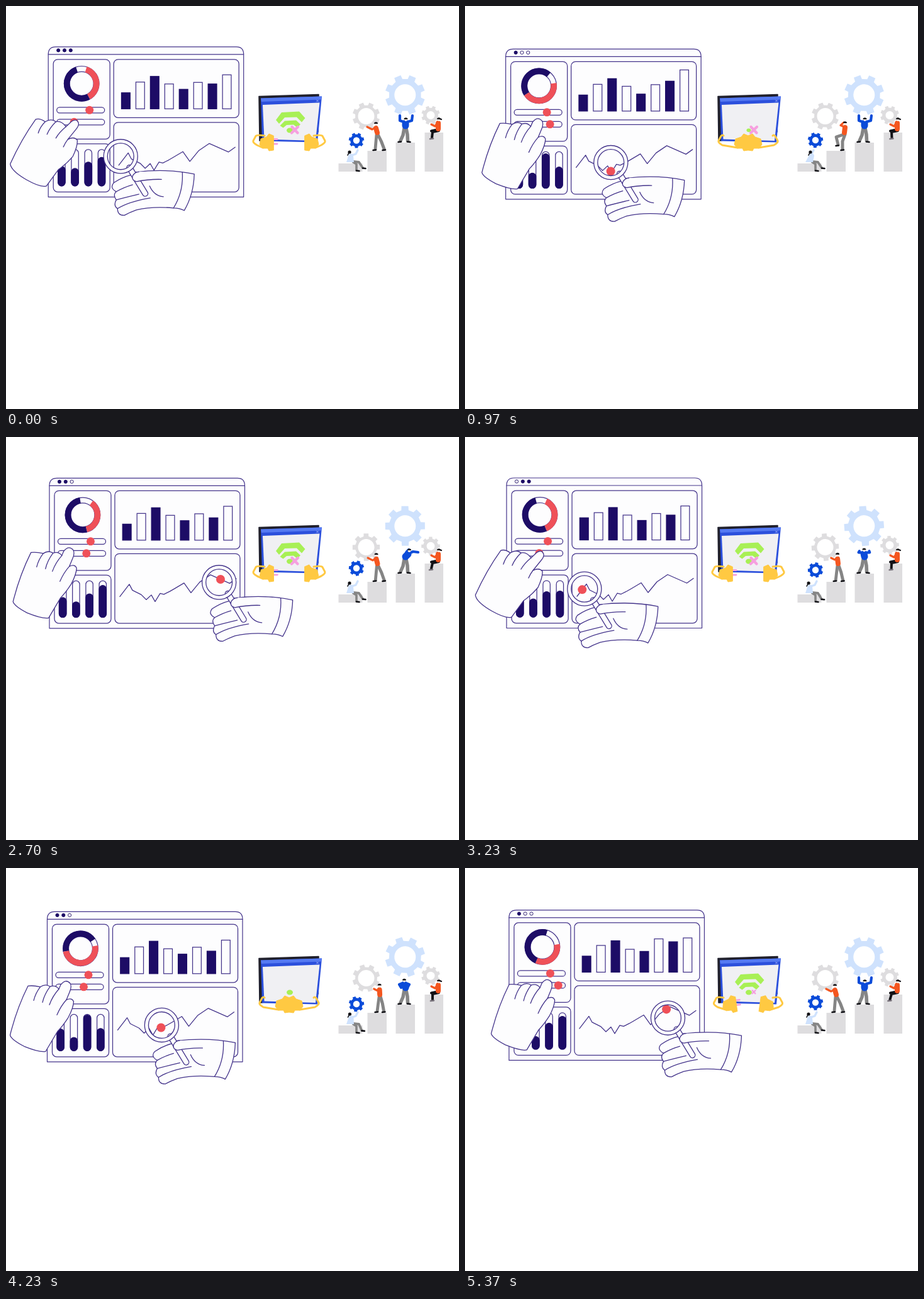
Write an HTML page that moves like this. It is 720 by 640 pixels and loops after 5.41 s.

```html
<!DOCTYPE html>
<html lang="en">
<head>
<meta charset="utf-8">
<title>Dashboard animation</title>
<style>
html, body { margin: 0; width: 100%; height: 100%; overflow: hidden; background: #fff; }
svg { display: block; width: 720px; height: 640px; }
</style>
</head>
<body>
<svg id="stage" viewBox="0 0 720 640" xmlns="http://www.w3.org/2000/svg"></svg>
<script>
const LOOP = 5410, CYCLE = 3030, TAU = 2 * Math.PI;
const NAVY = '#1d0c66', LINE = '#44348b', RED = '#ef5058', PAPER = '#fdfdfe';
const GREY = '#dedddf', BLUE = '#0b4bd9', SKY = '#cfe2fd', ORANGE = '#f4561f';
const BLACK = '#111116', PANTS = '#858585', YELLOW = '#ffc942', PINK = '#f6a0df', GREEN = '#a8f055';
const stage = document.getElementById('stage');

const clamp = v => Math.max(0, Math.min(1, v));
const lerp = (a, b, u) => a + (b - a) * u;
const fix = v => +v.toFixed(2);
const ramp = (v, from, to) => clamp((v - from) / (to - from));
const smooth = u => u * u * (3 - 2 * u);
const ease = (v, from, to) => smooth(ramp(v, from, to));
const wave = (p, peak = 0) => Math.cos(TAU * (p - peak));
// Rounded pulse around a centre, zero beyond its half width.
const bump = (v, centre, half) => Math.cos(clamp(Math.abs(v - centre) / half) * Math.PI / 2) ** 2;
const blend = (a, b, u) => a.map((v, i) => fix(lerp(v, b[i], u)));

function morph(from, to, u) {
  const goal = to.match(/[\d.]+/g);
  let i = 0;
  return from.replace(/[\d.]+/g, n => fix(lerp(+n, +goal[i++], u)));
}

const group = (x, y, body, more = '') => `<g transform="translate(${fix(x)} ${fix(y)}) ${more}">${body}</g>`;
const path = (d, fill = 'none', stroke = 'none', width = 1.3) =>
  `<path d="${d}" fill="${fill}" stroke="${stroke}" stroke-width="${width}" stroke-linecap="round" stroke-linejoin="round"/>`;
const rect = (x, y, w, h, r, fill = PAPER, stroke = LINE) =>
  `<rect x="${fix(x)}" y="${fix(y)}" width="${w}" height="${fix(h)}" rx="${r}" fill="${fill}" stroke="${stroke}" stroke-width="1.25"/>`;
const disc = (x, y, r, fill, stroke = 'none', width = 1.2) =>
  `<circle cx="${fix(x)}" cy="${fix(y)}" r="${r}" fill="${fill}" stroke="${stroke}" stroke-width="${width}"/>`;
const limb = (points, color, width) => path('M' + points.map(p => p.map(fix)).join(' '), 'none', color, width);

/* Dashboard: p runs through the slow cycle, q twice as fast */
const CHART = [[179, 253], [194, 233.5], [199, 243], [213, 250], [221, 258], [229, 250.5], [235, 261], [243, 248],
  [249, 249.5], [258, 245], [265, 241], [281, 231.5], [292, 247], [306, 230], [323, 218.5], [353.5, 232], [364, 224.5]];
const BAR_HEIGHTS = [25.5, 42.5, 51.5, 39.5, 31, 42, 39.5, 54];

function chartY(x) {
  const i = Math.max(1, CHART.findIndex(point => point[0] >= x));
  const [a, b] = [CHART[i - 1], CHART[i]];
  return lerp(a[1], b[1], ramp(x, a[0], b[0]));
}

function arc(from, to, color) {
  const at = deg => {
    const a = (deg - 90) * Math.PI / 180;
    return `${fix(120 + 23.5 * Math.cos(a))} ${fix(123.5 + 23.5 * Math.sin(a))}`;
  };
  return `<path d="M${at(from)}A23.5 23.5 0 ${to - from > 180 ? 1 : 0} 1 ${at(to)}" fill="none" stroke="${color}" stroke-width="9.5"/>`;
}

function donut(p) {
  const gapStart = 23 - 42 * wave(p), redStart = Math.min(80, 100 - 83 * Math.max(0, wave(p))), redEnd = 212 - 60 * wave(p);
  return disc(120, 123.5, 27.8, PAPER, LINE) + disc(120, 123.5, 19, PAPER, LINE)
    + arc(redStart, redEnd, RED) + arc(redEnd, gapStart + 360, NAVY);
}

// A swell, followed by a small dip, runs through the bars from left to right.
function bars(q) {
  return BAR_HEIGHTS.map((base, i) => {
    const swell = .17 + .07 * i;
    const h = base + 12 * bump(q, swell, .13) - 4 * bump(q, swell + .19, .08);
    const odd = i % 2;
    return rect(183.3 + 22.95 * i, 163.5 - h, 13.8, h, 0, odd ? PAPER : NAVY, odd ? LINE : NAVY);
  }).join('');
}

function tubes(p) {
  const levels = [253 + 2 * wave(p), 263 + 6 * wave(p, .6), 239 + 10 * wave(p, .93), 243 + 9.5 * wave(p, .29)];
  return levels.map((top, i) => {
    const x = 82.5 + 21.2 * i;
    return rect(x, 228, 11.4, 58, 5.7) + rect(x, top, 11.4, 286 - top, 5.7, NAVY, NAVY);
  }).join('');
}

function lights(q) {
  return [0, 1, 2].map(i => {
    const age = (q - .515 - .2 * i + 1) % 1;
    const on = ramp(age, 0, .02) * (1 - ramp(age, .54, .59));
    return disc(83 + 9.8 * i, 70.6, 2.6, `rgba(29,12,102,${fix(on)})`, NAVY, .9);
  }).join('');
}

const knobX = q => 108 + 41 * (1 - Math.abs(2 * q - 1));

function dashboard(p, q) {
  const spotX = 175 + 184 * p;
  return path('M67 303.5V77Q67 65 79 65H366Q377.5 65 377.5 77V303.5Z', PAPER, LINE, 1.2)
    + path('M67 77H377.5', 'none', LINE, 1.2) + lights(q)
    + rect(75, 85, 90, 126.5, 7) + rect(171, 85, 199, 92.5, 7) + rect(75, 219, 90, 76.5, 7) + rect(171, 185, 199, 110.5, 7)
    + donut(p) + rect(80.5, 161, 76, 9, 4.5) + rect(80.5, 180, 76, 9, 4.5)
    + disc(132.5, 165.5, 6.5, RED) + disc(knobX(q), 184.5, 6.5, RED)
    + bars(q) + tubes(p) + path('M' + CHART.join(' '), 'none', LINE, 1.3)
    + (p > .04 && p < .925 ? disc(spotX, chartY(spotX), 7, RED) : '');
}

const POINT_DOWN = 'M47 180Q54 178 62 184Q72 178 79 184Q88 182 95 192L104 183.5Q112 178 115 186Q116 190 111 196L98 212Q108 207 113 213Q114 222 106 239Q96 251 83 260L64 286Q55 289 32 276Q8 262 6.5 251Q24 212 47 180Z';
const POINT_UP = 'M57 183Q66 182 76.5 184.5Q85 179 92 184Q101 181 106 188L109 181Q117 171 124 179Q127 184 123 193L118 205Q127 201 129.5 208Q129 218 121 233Q112 247 104 255L85 287Q76 289 51 279Q30 268 28.5 261Q39 219 57 183Z';
const CREASE_DOWN = 'M62 184Q54 192 51 202M79 184Q69 194 65 204M95 192Q85 200 79 210M98 212Q94 217 91 224';
const CREASE_UP = 'M76.5 184.5Q69 194 66 206M92 184Q83 196 80 209M106 188Q96 199 91 213M118 205Q109 215 103 229';

// The finger drags the knob right, lifts off and swings back.
function pointer(q) {
  const lift = ease(q, .49, .54) * (1 - ease(q, .92, 1));
  const x = lerp(knobX(q), 129 - 41 * ease(q, .5, .92), lift);
  const body = path(morph(POINT_DOWN, POINT_UP, lift), PAPER, LINE) + path(morph(CREASE_DOWN, CREASE_UP, lift), 'none', LINE);
  return group(x - lerp(108, 117.5, lift), 0, body);
}

function magnifier(p) {
  const out = ramp(p, 0, .91), back = ramp(p, .91, 1);
  const x = 182 + 157 * lerp(out, smooth(out), .3) * (1 - smooth(back));
  const y = 239 + lerp(32.4 * out - 42 * out * out, 0, smooth(back)) + 14 * Math.sin(Math.PI * back);
  const hand = 'M206 264Q255 258 299 267Q298 300 283 325Q276 321 266 321Q232 318 207 324Q196 328 188 332.5Q177 333 177 322Q170 317 175 308Q169 300 175 295Q164 289 171 281Q184 272 200 268Z';
  const handle = [[196, 257], [221, 298]];
  const thumb = 'M247 275.5Q226 275 207 279Q199 277 201 270Q204 264 211 263.5';
  const body = path(hand, PAPER, LINE)
    + path('M175 295Q187 288 201 284M175 308Q190 304 211 299M177 322Q194 311 229 305M280 264Q282 295 266 321M228 286Q235 302 250 303', 'none', LINE)
    + limb(handle, LINE, 10) + limb(handle, PAPER, 7.4)
    + path(thumb + 'L244 263V275Z', PAPER) + path(thumb, 'none', LINE)
    + disc(182, 239, 24, 'none', LINE, 7.4) + disc(182, 239, 24, 'none', PAPER, 4.8);
  return group(x - 182, y - 239, body);
}

/* Connection window */
const zoom = (x, y, k, body) => k > .01 ? group(x, y, body, `scale(${fix(k)}) translate(${-x} ${-y})`) : '';

function signalLevel(p) {
  if (p < .38) return 3 - 2.3 * ramp(p, .26, .32);
  return p < .58 ? .7 + 2.3 * ramp(p, .38, .48) : 1 + 2 * ramp(p, .58, .68);
}

function plug(gap, prongs) {
  const x = 450 - gap, out = 403 - gap * .4, tilt = -11 * Math.sin(Math.PI * gap / 25);
  const cord = `M${x - 17} 225L${out + 6} 221Q${out - 1} 217 ${out} 214L${out + 4} 206.5Q${out + 6} 204 ${out + 8 + gap * .4} 206`;
  const body = `M${x} 206L${x - 7} 203L${x - 11} 208L${x - 20} 211L${x - 22} 220L${x - 17} 226L${x - 9} 226L${x - 7} 230L${x} 229Z`;
  const pins = prongs ? path(`M${x} 211.5H${x + 6}M${x} 219H${x + 6}`, 'none', PINK, 2.8) : '';
  const head = `<g transform="rotate(${fix(tilt)} ${x - 10} 217)">${pins + path(body, YELLOW, YELLOW, 1)}</g>`;
  return path(cord, 'none', YELLOW, 3) + head;
}

function connection(p) {
  const level = signalLevel(p);
  const gap = fix(25 * (1 - ease(p, .21, .31) + ramp(p, .57, .9) ** .6));
  const cross = 1 - ramp(p, .33, .38) + ramp(p, .72, .82);
  return path('M402 143.5L497 140.5L496 200L405 214H403Z', '#20202c', '#20202c', 1.5)
    + path('M405 146.5L502 143.5L495 216.5L407 214.5Z', '#2c50dc')
    + path('M405 146.5L502 143.5L501 148.5L406 152Z', '#557af2')
    + path('M408 157L498.5 153.5L492 214L410.5 211.5Z', '#f0f0f3')
    + path('M493.5 149L496.5 152M496.5 149L493.5 152', 'none', '#9fb2f7', .9)
    + zoom(451, 197, clamp(level - 2), path('M429 181L438 169L466 167.5L475.5 178L470 184.5L462 176.5L443 177L434 187Z', GREEN))
    + zoom(451, 197, clamp(level - 1), path('M435.5 190L443 182.5L461 181.5L468 188L463 193L457 188.5L446 189L440.5 193.5Z', GREEN))
    + zoom(451, 197, clamp(level), `<ellipse cx="451" cy="197.5" rx="5" ry="4" fill="${GREEN}"/>`)
    + zoom(459, 197, cross, path('M454.5 192L463.5 201.5M464 192L454 201.5', 'none', PINK, 4.3))
    + plug(gap, gap > 3) + group(900, 0, plug(gap, false), 'scale(-1 1)');
}

/* Workers and gears: s runs from 0 to 1 over the whole loop */
// head, hip, elbow, hand, front knee, front foot, back foot
const PUSH = [588, 188, 590, 204, 582, 196, 574, 192, 588, 215, 587, 228, 601, 228];
const STAND = [599, 187, 598, 204, 597, 193, 595, 192, 595, 215, 593, 228, 600, 228];
// head, chest, left elbow and hand, right elbow and hand
const ARMS_UP = [635.5, 180, 635, 186, 626, 182, 626, 174, 645, 182, 646, 174];
const ARMS_DOWN = [633, 178.5, 633, 185, 625, 185, 628, 190, 641, 185, 638, 190];
const ARM_OUT = [641, 180, 639, 186, 637, 182, 640, 179, 647, 182, 655, 183];

// Two short breaks from the work in the middle of the loop.
const rest = s => Math.sin(TAU * ramp(s, .18, .87)) ** 2;

function gear(x, y, teeth, outer, hole, color, turn) {
  const root = outer * .8, points = [];
  for (let i = 0; i < teeth; i++) {
    for (const [offset, r] of [[-.29, root], [-.22, outer], [.22, outer], [.29, root]]) {
      const a = (i + .5 + offset) / teeth * TAU;
      points.push(`${fix(r * Math.sin(a))} ${fix(-r * Math.cos(a))}`);
    }
  }
  const ring = `M${points.join('L')}ZM${hole} 0A${hole} ${hole} 0 1 0 ${-hole} 0A${hole} ${hole} 0 1 0 ${hole} 0Z`;
  return group(x, y, `<path fill-rule="evenodd" fill="${color}" d="${ring}"/>`, `rotate(${fix(turn)})`);
}

const shoe = (x, y, side = 1) => limb([[x - 2 * side, y + .5], [x + 2.5 * side, y + 1]], BLACK, 2.6);
const head = (x, y) => disc(x, y + .6, 2.4, '#fbeee8') + path(`M${x - 3} ${y}A3 2.8 0 0 1 ${x + 3} ${y}Z`, BLACK);

function sitter(s) {
  const tired = bump(s, .18, .12), fold = bump(s, .7, .12);
  const hx = 546 + 3 * tired + 2 * fold, handX = 559 - 5 * tired, footX = 567 - 7 * fold, footY = 257 + 4 * fold;
  return limb([[552, 248], [557, 251], [557, 261]], PANTS, 3.6) + limb([[552, 247], [561, 248], [footX, footY]], PANTS, 3.8)
    + shoe(559, 261) + shoe(footX + 2, footY)
    + path(`M${fix(hx - 1)} 235Q${fix(hx + 5)} 233 ${fix(hx + 6)} 238L553 248H541Z`, SKY)
    + limb([[hx + 4, 237], [handX - 3, 235], [handX, 229]], SKY, 3.4)
    + disc(hx, 232, 2.6, BLACK) + limb([[hx - 1, 233], [hx - 3, 237]], BLACK, 1.6);
}

function pusher(s) {
  const step = bump(s, .18, .1);
  const [hx, hy, px, py, ex, ey, ax, ay, kx, ky, fx, fy, bx, by] = blend(PUSH, STAND, Math.max(rest(s), step));
  const shift = 5 * step, raise = 7 * step;
  return limb([[px + shift + 1, py], [(px + bx) / 2 + 1, 215], [bx, by - 1]], PANTS, 5)
    + limb([[px + shift - 1, py], [kx - 5 * step, ky - raise], [fx, fy - 1 - raise]], PANTS, 4.8)
    + shoe(fx - 1, fy - raise, -1) + shoe(bx, by, -1)
    + limb([[hx + shift, hy + 6], [px + shift, py - 3]], ORANGE, 8)
    + limb([[hx + shift - 1, hy + 5], [ex, ey - raise / 2], [ax + raise, ay - raise]], ORANGE, 3.2)
    + head(hx + shift, hy - 1);
}

function lifter(s) {
  const down = ease(s, .56, .64) - ease(s, .89, .96);
  const pose = blend(blend(ARMS_UP, ARMS_DOWN, down), ARM_OUT, bump(s, .5, .1));
  const [hx, hy, cx, cy, le, ly, lx, lh, re, ry, rx, rh] = pose;
  return limb([[633, 194], [631, 205], [627, 214]], PANTS, 5.5) + limb([[636, 194], [638, 204], [638.5, 214]], PANTS, 5.5)
    + shoe(626, 215, -1) + shoe(640, 215) + limb([[cx, cy], [635, 190]], BLUE, 11)
    + limb([[cx - 3, cy - 2], [le, ly], [lx, lh]], BLUE, 4.2) + limb([[cx + 3, cy - 2], [re, ry], [rx, rh]], BLUE, 4.2)
    + head(hx, hy);
}

function rester(p) {
  const swing = 1.6 * Math.sin(TAU * p);
  return limb([[688, 198], [678, 200], [677 + swing, 209]], BLACK, 4) + limb([[688, 196], [676, 198.5]], BLACK, 4)
    + limb([[674 + swing, 211], [679 + swing, 210.5]], '#77717a', 2.6)
    + limb([[687, 186], [687, 195]], ORANGE, 8) + limb([[685, 186], [682, 191], [676, 188]], ORANGE, 3.2)
    + head(688, 180) + limb([[689, 179], [692, 180]], BLACK, 2.2);
}

function workers(s, p) {
  const swell = Math.sin(Math.PI * s), turn = 22 * swell ** 4;
  const toss = 6 * swell * Math.sin(TAU * (s - .16));
  const blocks = [[528.5, 250, 38], [574.5, 230, 30.5], [619.5, 217, 30.5], [665.5, 201, 29.5]];
  return blocks.map(([x, y, w]) => rect(x, y, w, 263 - y, 0, GREY, 'none')).join('')
    + gear(634.3, 141.3, 8, 32, 17, SKY, turn) + gear(572.5, 175, 8, 22, 13, GREY, turn)
    + gear(675, 173.5 - 4.5 * rest(s), 8, 15, 6.5, GREY, turn) + gear(557, 213.5 - toss, 7, 12.3, 5.2, BLUE, turn * 2)
    + sitter(s) + pusher(s) + lifter(s) + rester(p);
}

function render(t) {
  const p = t / CYCLE % 1, q = 2 * p % 1;
  const x = .2 - 2.8 * Math.sin(TAU * p), y = 2.3 - 2.5 * wave(p);
  stage.innerHTML = group(x, y, dashboard(p, q) + pointer(q) + magnifier(p)) + connection(p) + workers(t / LOOP, p);
}

const start = performance.now();
function tick() {
  render((performance.now() - start) % LOOP);
  requestAnimationFrame(tick);
}
tick();
</script>
</body>
</html>
```
